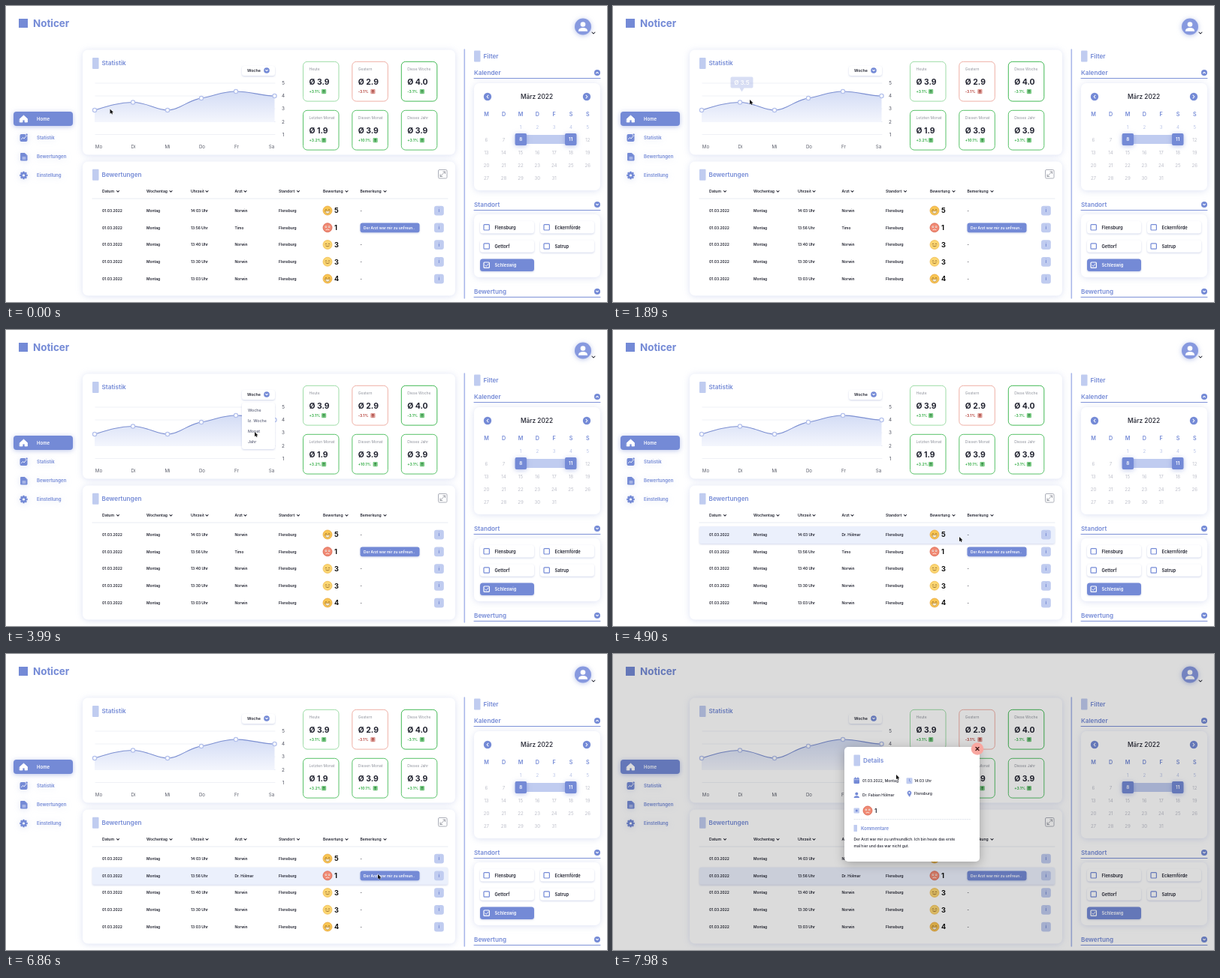
Write an HTML page that moves like this. It is 800 px wide and 395 px high and loops after 8 s.

```html
<!DOCTYPE html>
<html lang="de">
<head>
<meta charset="utf-8">
<title>Dashboard</title>
<style>
html, body { margin: 0; width: 100%; height: 100%; overflow: hidden; background: #fff; }
svg { display: block; width: 100vw; height: 100vh; }
text { font-family: Inter, "Open Sans", sans-serif; white-space: pre; }
.soft { filter: drop-shadow(0 1px 4px #8c9bd84d); }
.lift { filter: drop-shadow(0 1.2px 1.2px #6f7fbe52); }
.glow { filter: drop-shadow(0 1px 3px #7388d680); }
.deep { filter: drop-shadow(0 3px 7px #0004); }
</style>
</head>
<body>
<svg id="stage" viewBox="0 0 800 395" preserveAspectRatio="none"></svg>
<script>
const BLUE = '#748ad6', PALE = '#c0ccf0', INK = '#20222f', GREY = '#8f929c';
const GREEN = '#35ae47', RED = '#b5423c';
const LOOP = 8000;

const text = (x, y, s, size, fill = INK, weight = 600, anchor = 'start') =>
  `<text x="${x}" y="${y + size * .36}" font-size="${size}" font-weight="${weight}" fill="${fill}" text-anchor="${anchor}">${s}</text>`;
const rect = (x, y, w, h, r, fill, more = '') =>
  `<rect x="${x}" y="${y}" width="${w}" height="${h}" rx="${r}" fill="${fill}" ${more}/>`;
const circle = (x, y, r, fill, more = '') =>
  `<circle cx="${x}" cy="${y}" r="${r}" fill="${fill}" ${more}/>`;
const path = (d, stroke, width = 1, fill = 'none', more = '') =>
  `<path d="${d}" stroke="${stroke}" stroke-width="${width}" fill="${fill}" stroke-linecap="round" stroke-linejoin="round" ${more}/>`;
const group = (s, more = '') => `<g ${more}>${s}</g>`;
const at = (x, y, s) => group(s, `transform="translate(${x} ${y})"`);
const chevron = (x, y, color, turn = 0, size = 1.7) =>
  group(path(`M${-size} ${-size / 2}L0 ${size / 2}L${size} ${-size / 2}`, color, 1.05),
    `transform="translate(${x} ${y}) rotate(${turn})"`);
const roundChevron = (x, y, turn, r = 4) => circle(x, y, r, BLUE) + chevron(x, y, '#fff', turn, r * .36);
const card = (x, y, w, h) => rect(x, y, w, h, 7, '#fff', 'class="soft"');
const title = (x, y, s) => rect(x, y - 7.5, 8.5, 15, 1, PALE) + text(x + 12.5, y, s, 8.2, BLUE);

function face(x, y, mood) {
  const angry = mood === 1;
  const [skin, rim] = angry ? ['#f08a74', '#d4573f'] : mood === 3 ? ['#fbd672', '#efb848'] : ['#f8c552', '#e8a235'];
  const line = angry ? '#fff2ea' : '#7a4e1c';
  const eyes = angry
    ? circle(-2.1, -1, 1.3, line) + circle(2.1, -1, 1.3, line) + circle(-2, -.9, .5, '#8c2e20') + circle(2, -.9, .5, '#8c2e20')
    : path('M-3 -1Q-2 -2.2 -1 -1M1 -1Q2 -2.2 3 -1', line, .7);
  const mouth = angry ? path('M-2 2.8Q0 1.5 2 2.8', line, .8)
    : mood === 3 ? path('M-2.3 1.6Q0 3.4 2.3 1.6', line, .7)
    : path('M-3.2 .8H3.2Q2.4 4 0 4T-3.2 .8Z', line, .4, '#fff4d8');
  return at(x, y, circle(0, 0, 6, skin, `stroke="${rim}" stroke-width=".7"`) + eyes + mouth);
}

const person = (x, y, k, color) => at(x, y,
  circle(0, -1.7 * k, 1.9 * k, color) + `<path d="M${-3.5 * k} ${3.6 * k}Q${-3.5 * k} ${.8 * k} 0 ${.8 * k}T${3.5 * k} ${3.6 * k}Z" fill="${color}"/>`);

function navigation() {
  const gear = [0, 45, 90, 135].map(a => rect(-1.2, -5.3, 2.4, 10.6, .6, BLUE, `transform="rotate(${a})"`)).join('');
  return rect(17, 17, 12, 12, 0, BLUE) + text(36, 23, 'Noticer', 13.4, BLUE, 700)
    + circle(768, 27.5, 11, '#8799df', 'class="glow"') + person(768, 27.5, 1.75, '#fff') + chevron(782, 36, INK, 0, 2)
    + rect(10, 141, 79, 19, 4, BLUE, 'class="glow"')
    + path('M18.5 150.5L23.5 146L28.5 150.5V155H25V152H22V155H18.5Z', '#fff', .8, '#fff')
    + text(41, 150.7, 'Home', 6, '#fff')
    + group(rect(18.5, 171, 10, 10, 2, BLUE) + path('M20.5 177.5L22.5 175.5L24 177L26.5 174', '#fff', .9)
      + circle(27.6, 171.7, 1.6, BLUE, 'stroke="#fff" stroke-width=".7"')
      + path('M20 196.5H25L28 199.5V206H20Z', BLUE, 1, BLUE) + path('M22 202H26M22 204H26', '#fff', .7)
      + at(23.5, 226, gear + circle(0, 0, 3.9, BLUE) + circle(0, 0, 1.6, '#fff'))
      + text(41, 176, 'Statistik', 6, BLUE) + text(41, 201, 'Bewertungen', 6.1, BLUE) + text(41, 226, 'Einstellung', 6.1, BLUE), 'class="soft"');
}

const points = [[118, 139], [169, 128.5], [215, 139], [260, 123], [306, 114], [357.5, 120]];

function chart() {
  const curve = 'M118 139C134 134 150 128.5 169 128.5S199 139 215 139S241 126 260 123S286 114 306 114S340 120 357.5 120';
  const levels = [103, 120, 137, 154.5, 171.5];
  return levels.map((y, i) => path(`M119 ${y}H358`, i === 3 ? '#d5d9e6' : '#e9ebf2', .7) + text(369, y, 5 - i, 6.3, '#4b4e5c', 400, 'middle')).join('')
    + `<path d="${curve}V155H118Z" fill="url(#fade)"/>` + path(curve, '#7d90d2', 1.1)
    + points.map(([x, y]) => circle(x, y, 2.6, '#fff', 'stroke="#b4c1ec" stroke-width="1.3"')).join('')
    + ['Mo', 'Di', 'Mi', 'Do', 'Fr', 'Sa'].map((d, i) => text([123.5, 169.5, 215, 261, 307, 353.5][i], 187.5, d, 6.2, '#5d606d', 400, 'middle')).join('')
    + rect(314, 80, 44, 13, 3, '#fff', 'class="lift"') + text(321, 86.3, 'Woche', 5.3) + roundChevron(347, 86, 0, 3.8);
}

function tiles() {
  const data = [
    ['Heute', '3.9', '+3.1%', '#9ddca6'], ['Gestern', '2.9', '-3.1%', '#efb0a6'], ['Diese Woche', '4.0', '-3.1%', '#43b955'],
    ['Letzten Monat', '1.9', '+3.2%', '#58c268'], ['Diesen Monat', '3.9', '+10.1%', '#58c268'], ['Dieses Jahr', '3.9', '+3.1%', '#58c268']];
  return data.map(([label, value, change, edge], i) => {
    const down = label === 'Gestern', icon = 19.5 + (change.length - 5) * 3.2;
    return at([395.5, 460.8, 526.3][i % 3], i < 3 ? 74.3 : 139.3,
      rect(0, 0, 47.5, 52.8, 5.5, '#fff', `stroke="${edge}"`)
      + text(8, 9.5, label, 5, GREY, 400) + text(8, 26.5, 'Ø ' + value, 10.4, INK, 700)
      + text(8, 40, change, 4.9, down ? RED : GREEN, 700)
      + rect(icon + 5, 36.8, 6.2, 6.2, 1, down ? '#dd9a94' : '#7ccb86')
      + path(`M${icon + 8.1} 41.8V38.2m-1.4 1.4l1.4 -1.4l1.4 1.4`, down ? '#8f2722' : '#176d28', .7));
  }).join('');
}

const columns = [128, 187, 246, 304.5, 363];
const rows = [['14:03', 'Norwin', 5], ['13:56', 'Timo', 1], ['13:40', 'Norwin', 3], ['13:30', 'Norwin', 3], ['13:03', 'Norwin', 4]];
const rowY = i => 273 + i * 22.75;

function table() {
  const heads = [['Datum', 149], ['Wochentag', 219.5], ['Uhrzeit', 267.5], ['Arzt', 318.5], ['Standort', 389], ['Bewertung', 453.5], ['Bemerkung', 504.5]];
  const headX = [...columns, 422, 471.5];
  return title(115, 225.3, 'Bewertungen')
    + rect(575.5, 218.5, 11.5, 11.5, 1.5, '#fff', 'stroke="#a3a6b1" stroke-width=".9"')
    + path('M578 227.5L584.5 221M581.8 221H584.5V223.7M578 224.8V227.5H580.7', '#8b8e99', .8)
    + heads.map(([s, x], i) => text(headX[i], 247.3, s, 5.05) + chevron(x, 247.3, INK, 0, 1.6)).join('')
    + path('M115 257H588', '#e3e6f0', .8)
    + rows.map(([time, doctor, score], i) => {
      const y = rowY(i);
      const cell = (c, s, more = '') => group(text(columns[c], y, s, 4.9), more);
      return rect(115, y - 11, 473, 23, 2, '#ebf0fc', `id="hover${i}" class="lift"`)
        + cell(0, '01.03.2022') + cell(1, 'Montag') + cell(2, time + ' Uhr')
        + cell(3, doctor, `id="short${i}"`) + cell(3, 'Dr. Hölmar', `id="full${i}"`) + cell(4, 'Flensburg')
        + face(428, y, score) + text(437, y, score, 9.2, '#111', 700)
        + (score === 1 ? rect(471.5, y - 6.2, 79, 12.6, 3, BLUE, 'class="lift"') + text(476, y + .1, 'Der Arzt war mir zu unfreun..', 4.9, '#fff') : text(471.5, y, '-', 5))
        + rect(570, y - 6.3, 12.8, 12.8, 3, PALE) + text(576.4, y, 'i', 6, '#6379ca', 600, 'middle');
    }).join('');
}

function calendar() {
  const xs = [639.5, 662.5, 685, 707.3, 729.7, 752, 774.3];
  let days = '';
  for (let d = 1; d <= 31; d++) {
    const slot = d < 6 ? d + 1 : d + 1;
    if (d > 7 && d < 12) continue;
    days += text(xs[slot % 7], 161.5 + 17 * Math.floor(slot / 7), d, 6.1, d < 6 ? '#b9c4e8' : '#bdbfca', 400, 'middle');
  }
  const end = (x, d) => rect(x - 7.7, 170, 15.5, 16, 2, BLUE, 'class="glow"') + text(x, 178.2, d, 6.3, '#fff', 600, 'middle');
  return card(623, 103, 168, 143) + roundChevron(641, 121, 90, 5.2) + roundChevron(773, 121, -90, 5.2)
    + text(706.5, 121.2, 'März 2022', 8.3, INK, 500, 'middle')
    + [...'MDMDFSS'].map((d, i) => text(xs[i], 144.5, d, 7.2, BLUE, 600, 'middle')).join('') + days
    + rect(685, 172, 67, 12, 0, PALE) + end(685.3, 8) + end(751.7, 11);
}

function filters() {
  const head = (y, s, turn) => text(623, y, s, 8.2, BLUE) + roundChevron(787, y, turn) + path(`M623 ${y + 7.5}H791`, '#7f92d8', 1);
  const places = ['Flensburg', 'Eckernförde', 'Gettorf', 'Satrup', 'Schleswig'];
  return path('M610.3 58V390', '#aab8ea', 1.6) + title(623, 67, 'Filter')
    + head(89, 'Kalender', 180) + head(265, 'Standort', 0) + head(381, 'Bewertung', 0) + calendar()
    + card(623, 278, 168, 84)
    + places.map((s, i) => {
      const x = i % 2 ? 711 : 631, y = 287 + 25.2 * Math.floor(i / 2), on = i === 4;
      return rect(x, y, 72, 16.5, 3.5, on ? BLUE : '#fff', 'class="lift"')
        + rect(x + 5, y + 4.6, 7.4, 7.4, 1, 'none', `stroke="${on ? '#fff' : BLUE}" stroke-width="1.2"`)
        + (on ? path(`M${x + 6.8} ${y + 8.5}l1.5 1.5l2.6 -3.2`, '#fff', .9) : '')
        + text(x + 19.5, y + 8.5, s, 5.8, on ? '#fff' : INK);
    }).join('');
}

const tooltip = (id, [x, y], s) => group(at(x + 2.5, y - 13,
  `<path d="M-13 -21H13Q15 -21 15 -19V-8Q15 -6 13 -6H3L0 -1L-3 -6H-13Q-15 -6 -15 -8V-19Q-15 -21 -13 -21Z" fill="#8b9dde"/>`
  + text(0, -13.5, s, 8, '#fff', 600, 'middle')), `id="${id}"`);

const dropdown = () => group(rect(314, 97, 44, 62, 3, '#fff', 'class="lift"')
  + ['Woche', 'lz. Woche', 'Monat', 'Jahr'].map((s, i) => text(322, 107.5 + 13.8 * i, s, 5.3, '#5c6179', 500)).join(''), 'id="menu"');

function modal() {
  const line = (x, y, s) => text(x, y, s, 5, INK, 500);
  return group(rect(0, 0, 800, 395, 0, '#000', 'opacity=".14"'), 'id="shade"')
    + group(rect(308, 124, 180, 153, 5, '#fff', 'class="deep"') + title(320.5, 142, 'Details')
      + rect(320.5, 165.5, 7.5, 7.5, 1.2, BLUE) + path('M322.5 164.7V166.5M326 164.7V166.5', BLUE, 1) + path('M321 167.7H327.5', '#fff', .5)
      + rect(390.5, 165.3, 8, 8, 1.2, PALE) + path('M394.5 167V169.5L396 170.5', BLUE, .8)
      + person(324.3, 188.3, 1.05, BLUE)
      + path('M394.5 190L392.3 186.5A2.5 2.5 0 1 1 396.7 186.5Z', BLUE, .8, BLUE) + circle(394.5, 185.3, 1, '#fff')
      + rect(320.5, 205.5, 7.5, 7, 1, PALE) + circle(324.3, 209, 1.5, BLUE)
      + line(332, 169.3, '01.03.2022, Montag') + line(401, 169, '14:03 Uhr')
      + line(332, 188.5, 'Dr. Fabian Hölmar') + line(401, 186.5, 'Flensburg')
      + face(339, 209, 1) + text(348, 209, '1', 8.2, INK, 600)
      + path('M321 220.7H476', '#cfd3df', .6, 'none', 'stroke-dasharray="1.5 1.5"')
      + rect(320.5, 228, 4.5, 9, .5, PALE) + text(330, 232.5, 'Kommentare', 6, BLUE)
      + line(320.5, 247.5, 'Der Arzt war mir zu unfreundlich. Ich bin heute das erste')
      + line(320.5, 255.7, 'mal hier und das war nicht gut.')
      + circle(485, 126.5, 8.3, '#f8a7a0') + path('M483 124.5L487 128.5M487 124.5L483 128.5', '#3a1414', 1.3), 'id="dialog"');
}

stage.innerHTML = `<defs><linearGradient id="fade" x1="0" y1="0" x2="0" y2="1">
  <stop stop-color="#d3dcf5"/><stop offset="1" stop-color="#f4f6fd"/></linearGradient></defs>`
  + navigation() + card(102, 58.5, 496, 140) + title(115, 76.5, 'Statistik') + chart() + tiles()
  + card(102, 207.5, 496, 179) + table() + filters()
  + tooltip('tipMo', points[0], 'Ø 2.9') + tooltip('tipDi', points[1], 'Ø 3.5')
  + dropdown() + modal()
  + group(path('M0 0V6.2L1.5 4.9L2.5 7L3.5 6.5L2.6 4.5L4.5 4.4Z', '#fff', .6, '#111', 'paint-order="stroke"'), 'id="pointer"');

// Smooth interpolation through [time, value] keys that never overshoots and rests on holds.
function track(keys) {
  const slope = i => keys[i + 1] && keys[i] ? (keys[i + 1][1] - keys[i][1]) / (keys[i + 1][0] - keys[i][0]) : 0;
  const tangent = i => {
    const a = slope(i - 1), b = slope(i);
    return a * b > 0 ? 2 * a * b / (a + b) : 0;
  };
  return t => {
    const i = keys.findLastIndex(k => k[0] <= t);
    if (i < 0) return keys[0][1];
    if (i === keys.length - 1) return keys[i][1];
    const [t0, v0] = keys[i], [t1, v1] = keys[i + 1], d = t1 - t0, u = (t - t0) / d;
    return v0 + (v1 - v0) * u * u * (3 - 2 * u) + d * u * (1 - u) * ((1 - u) * tangent(i) - u * tangent(i + 1));
  };
}

const moves = [[0, 138.5, 137.5], [70, 138.5, 137.5], [520, 119, 139.5], [910, 119, 139.5], [1050, 152, 129.5],
  [1400, 169, 128.5], [1750, 169, 128.5], [2520, 328, 86], [2730, 333.5, 84], [3010, 333.5, 84],
  [3640, 331, 136], [3990, 331, 136], [4760, 459, 272], [4900, 461, 276], [5180, 440, 278], [5600, 440, 278],
  [6230, 295, 348], [6370, 300, 347], [6860, 495, 294], [7140, 495, 294], [7770, 380, 163], [7980, 377, 161]];
const pointerX = track(moves.map(m => [m[0], m[1]]));
const pointerY = track(moves.map(m => [m[0], m[2]]));
const opacities = Object.entries({
  tipMo: [[420, 0], [600, 1], [960, 1], [1140, 0]],
  tipDi: [[1200, 0], [1400, 1], [1780, 1], [1960, 0]],
  menu: [[2800, 0], [2870, .4], [3010, 1], [3990, 1], [4200, 0]],
  shade: [[6935, 0], [7000, .6], [7140, 1]],
  dialog: [[6935, 0], [7000, .65], [7140, 1]],
}).map(([id, keys]) => [document.getElementById(id), track(keys)]);
const rowParts = rows.map((_, i) => ['hover', 'full', 'short'].map(n => document.getElementById(n + i)));

function draw(now) {
  const t = now % LOOP, x = pointerX(t), y = pointerY(t);
  pointer.setAttribute('transform', `translate(${x} ${y})`);
  for (const [el, opacity] of opacities) el.style.opacity = opacity(t);
  const active = t > 6860 ? 1 : Math.floor((y - rowY(0) + 11.4) / 22.75);
  rowParts.forEach(([hover, full, short], i) => {
    hover.style.display = full.style.display = i === active ? '' : 'none';
    short.style.display = i === active ? 'none' : '';
  });
  requestAnimationFrame(() => draw(performance.now() - start));
}
const start = performance.now();
draw(0);
</script>
</body>
</html>
```
